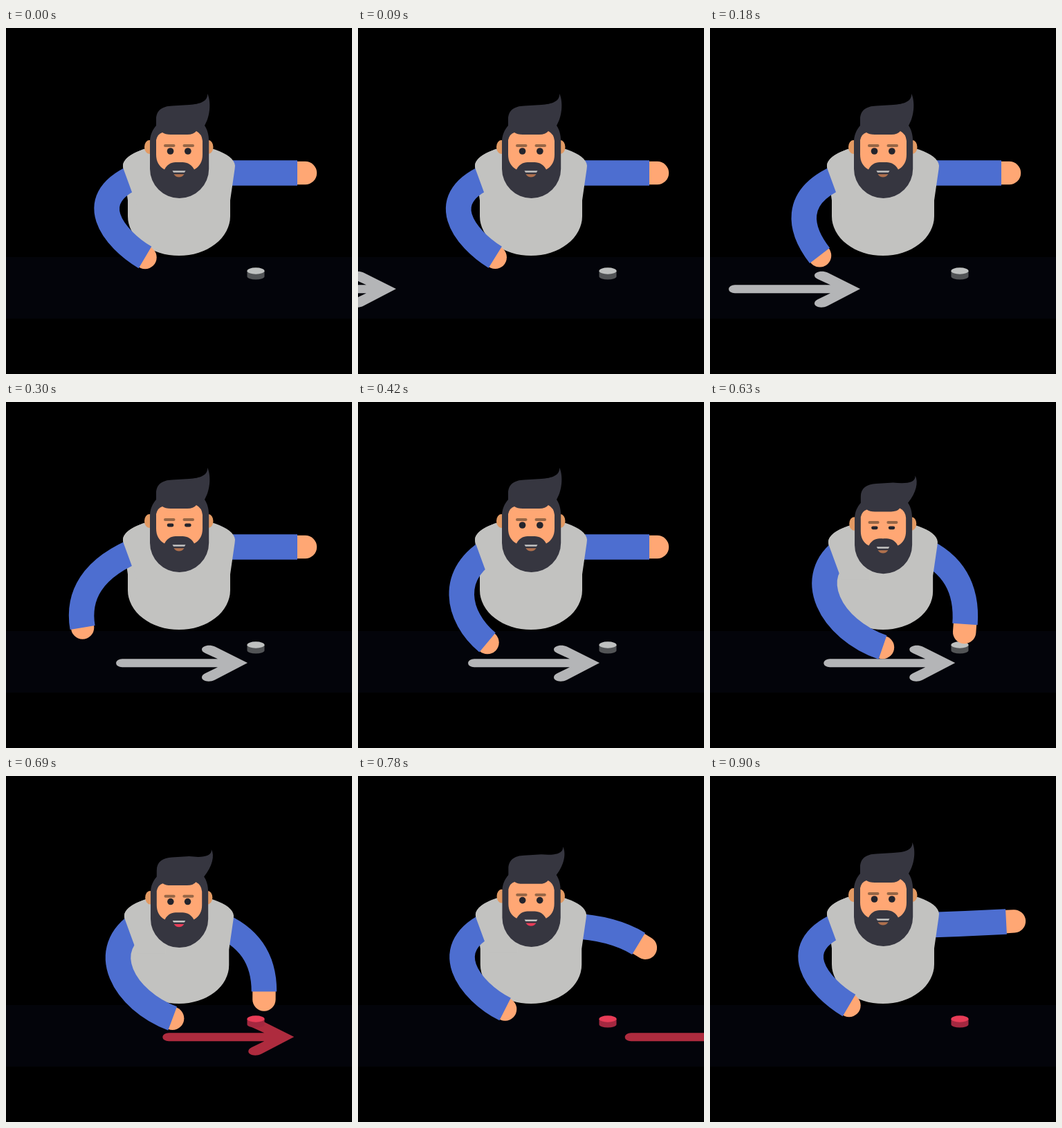
Recreate the animation shown at these times as an HTML page. Size 500 px wide and 500 px high, loop 930 ms.

```html
<!DOCTYPE html>
<html lang="en">
<head>
<meta charset="utf-8">
<title>Swipe and press</title>
<style>
  html, body { margin: 0; height: 100%; overflow: hidden; background: #000; }
  svg { display: block; width: 100%; height: 100%; }
  .sleeve { fill: none; stroke: #4d6ed0; stroke-width: 36.5; }
  .skin { fill: #ffa774; }
  .dark { fill: #363640; }
  .palm { stroke: #ffa774; stroke-width: 33.4; stroke-linecap: round; }
</style>
</head>
<body>
<svg viewBox="0 0 500 500">
  <defs>
    <path id="torso" fill="#c2c2c0" d="M250 165 C285 168 330 180 331 199 L330.5 204 L324 249 V272 A74 57 0 0 1 176 272 V249 L169.5 204 L169 199 C170 180 215 168 250 165Z"/>
    <clipPath id="armhole"><path d="M150 150 L168 199 L188.5 255 H230 V150Z"/></clipPath>
  </defs>

  <rect y="331" width="500" height="89" fill="#03040a"/>
  <path id="arrow" d="M349 377 L302 353.5 C293 349.5 283 353 283 357.5 C283 360 285 361.5 288 363 L306 371.3 H168 A9 6 0 0 0 168 383.3 H306 L288 392 C285 393.5 283 395 283 398 C283 403 293 406 302 401.5Z"/>
  <path id="side" d="M348.5 351 V359 A12.5 4.5 0 0 0 373.5 359 V351Z"/>
  <ellipse id="cap" cx="361" cy="351" rx="12.6" ry="4.7"/>

  <path id="rightHand" class="palm"/>
  <path id="rightArm" class="sleeve"/>
  <g class="lean"><use href="#torso"/></g>
  <circle id="leftHand" class="skin" r="16.7"/>
  <path id="leftArm" class="sleeve"/>

  <g class="lean">
    <use href="#torso" clip-path="url(#armhole)"/>
    <g fill="#e39a63">
      <ellipse cx="207" cy="172" rx="7" ry="10"/>
      <ellipse cx="292.5" cy="172" rx="7" ry="10"/>
    </g>
    <path class="dark" d="M208 165 C208 154 212 147 217 141 L230 125 H275 L287 141 C291 147 293.2 154 293.2 165 V203.5 A42.6 42.6 0 0 1 208 203.5Z"/>
    <path id="hair" class="dark"/>
    <path class="skin" d="M217 162 Q219 153 226 151 Q230 154 238 154 H262 Q271 154 275 149 Q283 153 284 163 V183 C284 193 280 200 272 204.5 C266 193 256 194 250 194 C244 194 235 193 229 204.5 C221 200 217 193 217 183Z"/>
    <g fill="#966646">
      <rect x="228" y="168" width="16.5" height="4" rx="2"/>
      <rect x="255.5" y="168" width="16.5" height="4" rx="2"/>
    </g>
    <g fill="#24242c">
      <rect class="eye" x="232.7" width="9.7"/>
      <rect class="eye" x="258" width="9.7"/>
    </g>
    <path fill="#c6c6c4" d="M240.5 206.2 H259.5 L258 208.8 H242Z"/>
    <path id="mouth" d="M242.5 211.3 H257.5 C254.5 217 245.5 217 242.5 211.3Z"/>
  </g>
</svg>

<script>
const LOOP = 930, STEP = 30, PRESS = 660;

// Left arm: elbow handle, forearm handle, wrist.
const REST = [104, 245, 158, 306, 201, 331.5];
const BACK = [122, 239, 103, 282, 110.5, 326];
const SWIPE = [134, 253, 170, 330, 240, 362.5];
const FOLLOW = [134, 252, 174, 328.5, 249.5, 354.5];

// Right arm: shoulder, handle, wrist.
const OUT = [310, 209.5, 365, 209.5, 421, 209.5];
const DOWN = [305, 213, 374, 243, 368.5, 321];

const $ = id => document.getElementById(id);
const all = selector => document.querySelectorAll(selector);
const set = (node, attrs) => {
  for (const name in attrs) node.setAttribute(name, attrs[name]);
};
// Eased 0 to 1 between two times.
const ease = (t, start, end) => {
  const p = Math.min(1, Math.max(0, (t - start) / (end - start)));
  return p * p * (3 - 2 * p);
};
const mix = (a, b, p) => a.map((v, i) => v + (b[i] - v) * p);

function drawLeftArm(t) {
  let arm = mix(REST, BACK, ease(t, 65, 305));
  arm = mix(arm, SWIPE, ease(t, 305, 510));
  arm = mix(arm, FOLLOW, ease(t, 510, 630));
  arm = mix(arm, REST, ease(t, 630, 850));
  set($('leftArm'), { d: `M196 211C${arm}` });
  set($('leftHand'), { cx: arm[4], cy: arm[5] });
}

function drawRightArm(t, press) {
  const sag = ease(t, PRESS, 780) * ease(t, LOOP, 900);
  const stretch = sag * ease(t, 780, 900);
  let [sx, sy, hx, hy, wx, wy] = mix(OUT, DOWN, press);
  sy += 6 * sag;
  hx += 5 * stretch;
  hy += 4 * stretch;
  wx += 7 * stretch;
  wy += stretch;
  const reach = 11.5 / Math.hypot(wx - hx, wy - hy);
  set($('rightArm'), { d: `M${sx} ${sy}Q${hx} ${hy} ${wx} ${wy}` });
  set($('rightHand'), { d: `M${wx} ${wy}l${(wx - hx) * reach} ${(wy - hy) * reach}` });
}

function drawHead(t, press) {
  const scale = 1 - .025 * press ** .7;
  for (const g of all('.lean'))
    set(g, { transform: `translate(250 329) scale(${scale}) translate(-250 -329)` });

  const sway = t > 420 ? Math.sin(Math.PI * (t - 420) / (LOOP - 420)) : 0;
  const dx = 7 * sway, dy = 6 * sway, x = 291 + dx, y = 95 + dy;
  set($('hair'), { d: `M217 141V132C217 119 226 113 240 112.5L265 111
    C${280 + dx / 2} ${110 + dy / 2} ${x + 1} ${y + 11} ${x} ${y}
    C${x + 5} ${y + 9} ${296 + dx / 2} 126 287 141L270 153H228Z` });

  const away = Math.min(Math.abs(t - 315), Math.abs(t - 645));
  const height = 9.7 * Math.min(1, .25 + away / 60);
  for (const eye of all('.eye')) set(eye, { y: 178 - height / 2, height, rx: height / 2 });
}

function drawTable(t) {
  const pressed = t >= PRESS;
  const slide = 375 * (ease(t, 0, 300) - 1 + ease(t, 609, 909));
  set($('arrow'), { transform: `translate(${slide})`, fill: pressed ? '#ae2b3e' : '#b4b5b7' });
  set($('cap'), { fill: pressed ? '#e83c57' : '#bfc1c0' });
  set($('side'), { fill: pressed ? '#a42840' : '#525456' });
  set($('mouth'), { fill: pressed && t < 870 ? '#e83c57' : '#b0714d' });
}

function tick() {
  const t = Math.floor(performance.now() % LOOP / STEP) * STEP;
  const press = ease(t, 423, 630) - ease(t, 655, 850);
  drawTable(t);
  drawLeftArm(t);
  drawRightArm(t, press);
  drawHead(t, press);
  requestAnimationFrame(tick);
}
tick();
</script>
</body>
</html>
```
